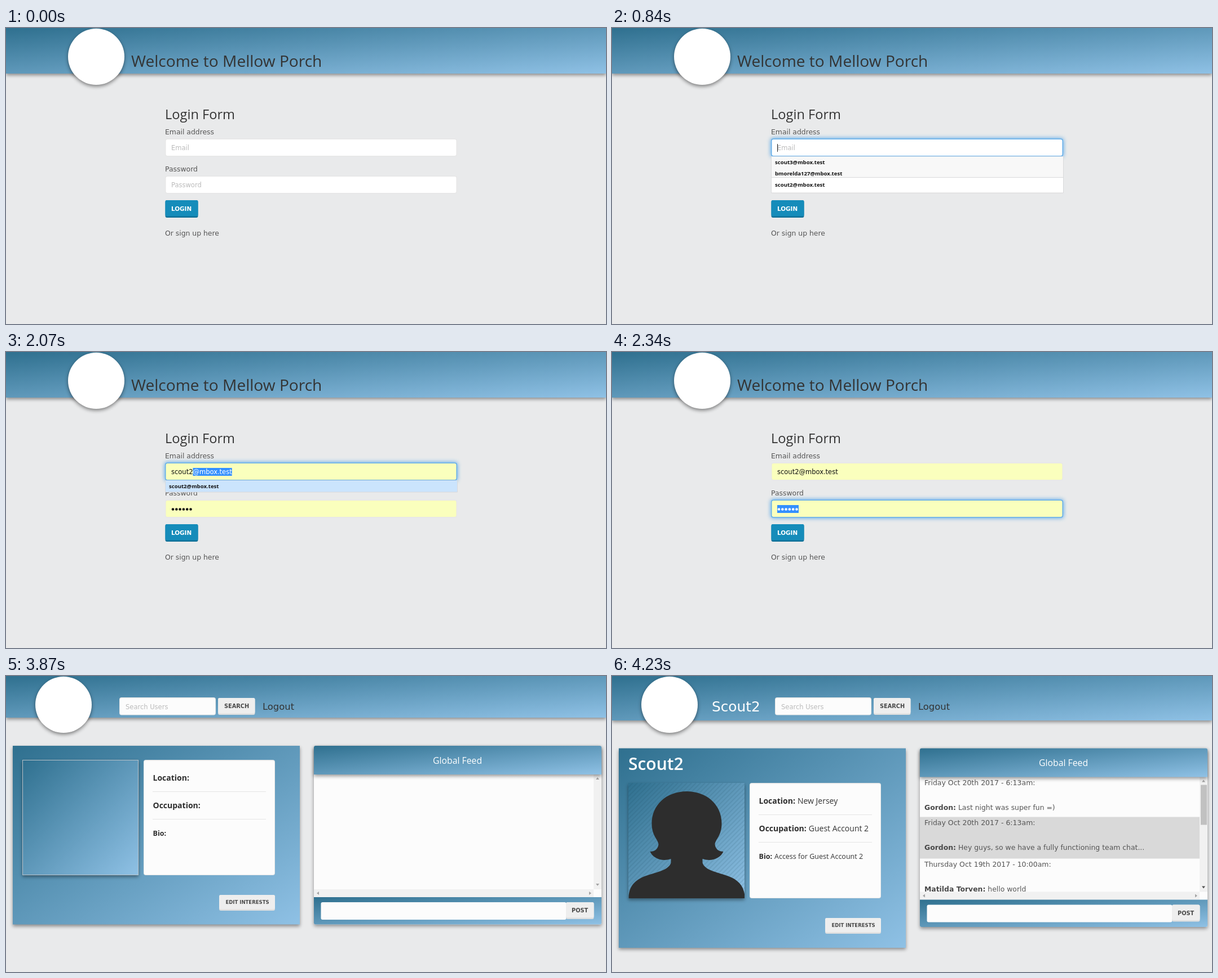
Write an HTML page with a canvas that moves like this. It is 1064 px wide and 526 px high and loops after 6750 ms.

```html
<!DOCTYPE html>
<html lang="en">
<head>
<meta charset="utf-8">
<title>Login demo</title>
<style>
  html, body { margin: 0; height: 100%; overflow: hidden; background: #e9eaeb; }
  canvas { display: block; }
</style>
</head>
<body>
<canvas id="stage" width="1064" height="526"></canvas>
<script>
const ctx = document.getElementById('stage').getContext('2d');
const LOOP = 6750;
const BODY = '"DejaVu Sans", sans-serif';
const HEAD = '"Open Sans", "Noto Sans", sans-serif';
const USER = 'scout2', DOMAIN = '@mbox.test';
const YELLOW = '#faffbd', SELECT = '#338fff', PAPER = '#fcfcfc', SOFT = '#bbb';

const ramp = (t, from, to) => Math.min(1, Math.max(0, (t - from) / (to - from)));

function text(str, x, y, size, color = '#555', family = BODY, weight = 400, align = 'left') {
  ctx.font = `${weight} ${size}px ${family}`;
  ctx.fillStyle = color;
  ctx.textAlign = align;
  ctx.fillText(str, x, y);
  return ctx.measureText(str).width;
}

function box(x, y, w, h, fill, radius = 0, shadow = 0) {
  ctx.save();
  if (shadow) {
    ctx.shadowColor = `rgba(0,0,0,${shadow})`;
    ctx.shadowBlur = 6;
    ctx.shadowOffsetY = 3;
  }
  ctx.fillStyle = fill;
  ctx.beginPath();
  ctx.roundRect(x, y, w, h, radius);
  ctx.fill();
  ctx.restore();
}

// Same geometry as CSS "to bottom right"
function blueBox(x, y, w, h, radius = 0, shadow = 0.4) {
  const k = w * h / (w * w + h * h), cx = x + w / 2, cy = y + h / 2;
  const g = ctx.createLinearGradient(cx - h * k, cy - w * k, cx + h * k, cy + w * k);
  g.addColorStop(0, '#2f708f');
  g.addColorStop(1, '#8fc1e5');
  box(x, y, w, h, g, radius, shadow);
}

function badge(x) {
  box(x - 50, 1, 100, 100, '#fff', 50, 0.45);
}

function button(label, x, y, w, h, size, tx, ty, fill = '#eee', edge = '#dfdfdf', color = '#484848') {
  box(x, y, w, h, edge, 3);
  box(x, y, w, h - 2.5, fill, 3);
  text(label, tx, ty, size, color, BODY, 700);
}

function caret(x, y) {
  box(x, y, 1, 14, '#222');
}

function field(y, fill, focus) {
  ctx.save();
  ctx.shadowColor = `rgba(102,175,233,${0.75 * focus})`;
  ctx.shadowBlur = 7;
  box(282, y, 518, 32, '#e7e7e7', 4);
  ctx.globalAlpha = focus;
  box(282, y, 518, 32, '#66afe9', 4);
  ctx.restore();
  box(283.5, y + 1.5, 515, 29, fill, 3);
}

function dropdown(names, bottom, fill) {
  box(282, 228, 519, bottom - 228, '#d9dadb', 1);
  box(283, 228.5, 517, bottom - 229.5, fill);
  names.forEach((name, i) => text(name + DOMAIN, 289, 242 + 20 * i, 9.6, '#111', HEAD, 700));
}

function emailField(t, filled, cleared) {
  const focus = ramp(t, 550, 690) * (1 - ramp(t, 2190, 2340));
  field(196.5, filled ? YELLOW : '#fff', focus);
  const typed = [900, 960, 1020, 1110, 1200, 1380].filter(at => t >= at).length;
  if (!typed || cleared) {
    text('Email', 293, 217, 11.5, SOFT);
    if (t >= 600 && !cleared) caret(293, 206);
    return;
  }
  const width = text(USER.slice(0, typed), 293, 217, 11.5, filled ? '#111' : '#555');
  if (!filled) {
    if (t < 1860) caret(293 + width, 206);
  } else if (t < 2100) {
    box(293 + width, 206, ctx.measureText(DOMAIN).width, 14, SELECT);
    text(DOMAIN, 293 + width, 217, 11.5, '#fff');
  } else {
    text(DOMAIN, 293 + width, 217, 11.5, '#111');
  }
}

function passwordField(t, filled, cleared) {
  field(262.5, filled ? YELLOW : '#fff', ramp(t, 2190, 2340));
  if (!filled || cleared) {
    text('Password', 293, 283, 11.5, SOFT);
    if (cleared) caret(293, 272);
    return;
  }
  const selected = t >= 2220;
  if (selected) box(293, 272, 38, 14, SELECT);
  ctx.fillStyle = selected ? '#fff' : '#111';
  for (let i = 0; i < 6; i++) {
    ctx.beginPath();
    ctx.arc(296 + 6.3 * i, 279.5, 2.3, 0, 7);
    ctx.fill();
  }
}

function loginPage(t) {
  const filled = t >= 2070, cleared = t >= 3270;
  blueBox(0, 0, 1064, 81);
  badge(160);
  text('Welcome to Mellow Porch', 222, 69, 28.1, '#333', HEAD);
  text('Login Form', 282, 162, 23.6, '#333', HEAD);
  text('Email address', 282, 188.5, 12.4);
  text('Password', 282, 254.5, 12.4);
  text('Or sign up here', 282, 369, 12.4);
  emailField(t, filled, cleared);
  passwordField(t, filled, cleared);
  button('LOGIN', 282.5, 306, 58, 31, 10.4, 293, 325, '#158cba', '#127299', '#fff');

  if (t >= 600 && t < 840) {
    ctx.globalAlpha = ramp(t, 570, 690);
    dropdown(['scout3', 'bmorelda127', 'scout2', 'scout1', 'bmorelda12'], 329, '#f8f8f8');
    ctx.globalAlpha = 1;
  } else if (t >= 840 && t < 870) {
    dropdown([], 293.5, '#fff');
    dropdown(['scout3', 'bmorelda127', 'scout2'], 266, '#f8f8f8');
  } else if (t >= 870 && t < 1380) {
    dropdown(['scout3', 'scout2', 'scout1'], 290, '#f8f8f8');
  } else if (t >= 1380 && t < 2100) {
    dropdown([USER], 249.5, filled ? '#cbe4fd' : '#f8f8f8');
  }
}

const halfFigure = new Path2D('M-.5 205C37 205 62 230 62 262C62 284 51 290 50 299C51 308 57 312 65 312C59 325 43 330 28 325V332C32 345 52 348 72 355C92 362 103 374 103 395H-.5Z');

// The portrait appears from the top down to the given row
function portrait(bottom) {
  ctx.save();
  ctx.beginPath();
  ctx.rect(29, 190, 206, bottom - 190);
  ctx.clip();
  ctx.strokeStyle = 'rgba(20,60,85,.1)';
  ctx.lineWidth = 2;
  ctx.beginPath();
  for (let x = 29; x < 445; x += 8) {
    ctx.moveTo(x, 190);
    ctx.lineTo(x - 206, 396);
  }
  ctx.stroke();
  ctx.fillStyle = '#2d2d2d';
  ctx.translate(132.5, 0);
  ctx.fill(halfFigure);
  ctx.scale(-1, 1);
  ctx.fill(halfFigure);
  ctx.restore();
}

function profilePanel(t, loaded) {
  blueBox(12, loaded ? 128.5 : 124, 509, loaded ? 354.5 : 317.5);
  if (loaded) text('Scout2', 29, 167, 30, '#fff', HEAD, 600);
  ctx.save();
  if (!loaded) ctx.translate(0, -41);
  blueBox(29, 190, 206, 205);
  if (loaded) {
    portrait(t < 4080 ? 204 : t < 4230 ? 237 : 395);
  } else {
    ctx.strokeStyle = '#b9c3ca';
    ctx.lineWidth = 1;
    ctx.strokeRect(29.5, 190.5, 205, 204);
  }
  box(244, 190, 233, 205, '#e7e7e7', 4);
  box(245, 191.5, 231, 202.5, PAPER, 3);
  const rows = [['Location:', 'New Jersey', 14], ['Occupation:', 'Guest Account 2', 14], ['Bio:', 'Access for Guest Account 2', 12.5]];
  rows.forEach(([label, value, size], i) => {
    const y = 227 + 49 * i, width = text(label, 260.5, y, size, '#2d2d2d', HEAD, 700);
    if (loaded) text(value, 260.5 + width + 4, y, size, '#333', HEAD);
    if (i < 2) box(260, y + 19, 201, 1, '#e5e5e5');
  });
  button('EDIT INTERESTS', 378, 430, 99, 28, 8.5, 389.5, 446);
  ctx.restore();
}

function arrow(x, y, dx, dy, color) {
  ctx.fillStyle = color;
  ctx.beginPath();
  ctx.moveTo(x + 2 * dx, y + 2 * dy);
  ctx.lineTo(x - 2 * dx + 3 * dy, y - 2 * dy + 3 * dx);
  ctx.lineTo(x - 2 * dx - 3 * dy, y - 2 * dy - 3 * dx);
  ctx.fill();
}

function posts() {
  ctx.save();
  ctx.beginPath();
  ctx.rect(546, 51.5, 496, 204);
  ctx.clip();
  box(546, 122, 496, 74, '#d9d9d9');
  const feed = [
    [65, 'Friday Oct 20th 2017 - 6:13am:', 'Gordon:', 'Last night was super fun =)'],
    [136, 'Friday Oct 20th 2017 - 6:13am:', 'Gordon:', 'Hey guys, so we have a fully functioning team chat...'],
    [210, 'Thursday Oct 19th 2017 - 10:00am:', 'Matilda Torven:', 'hello world']
  ];
  for (const [y, date, author, message] of feed) {
    text(date, 554, y, 12.5);
    const width = text(author, 554, y + 44.5, 12.4, '#484848', BODY, 700);
    text(message, 554 + width + 4, y + 44.5, 12.4);
  }
  ctx.restore();
}

function feedPanel(loaded, filled) {
  ctx.save();
  ctx.translate(0, loaded ? 128.5 : 124);
  box(546, 0, 510, 317.5, PAPER, 3, 0.4);
  if (filled) posts();
  box(1042, 51, 14, 204, '#f1f1f1');
  box(546, 255, 496, 14, '#f1f1f1');
  if (filled) box(1044, 65, 11, 71, '#c1c1c1');
  arrow(1049, 58, 0, -1, '#a3a3a3');
  arrow(1049, 247, 0, 1, filled ? '#505050' : '#a3a3a3');
  arrow(553, 262, -1, 0, '#a3a3a3');
  arrow(1036, 262, 1, 0, '#a3a3a3');
  blueBox(546, 0, 510, 51, [3, 3, 0, 0]);
  text('Global Feed', 800.5, 31.5, 15.8, '#fff', HEAD, 400, 'center');
  blueBox(546, 269, 510, 48.5, [0, 0, 3, 3], 0);
  box(558.5, 278, 435, 31, PAPER, 3);
  button('POST', 993, 278, 49.5, 30, 9.8, 1003, 296);
  ctx.restore();
}

function homePage(t) {
  const loaded = t >= 3900, shift = loaded ? 88 : 0;
  blueBox(0, 0, 1064, loaded ? 79 : 74);
  badge(102);
  if (loaded) text('Scout2', 177, 63, 24.8, '#fff');
  ctx.save();
  ctx.translate(shift, 0);
  box(201, 38, 171, 31.5, '#e7e7e7', 4);
  box(202, 39.5, 169, 29, PAPER, 3);
  text('Search Users', 212, 58.5, 11.5, SOFT);
  button('SEARCH', 376, 39, 65.5, 30, 9.8, 387, 57);
  text('Logout', 455, 60, 16.4, '#333');
  ctx.restore();
  profilePanel(t, loaded);
  feedPanel(loaded, t >= 3930);
}

function draw(now) {
  const t = now % LOOP;
  box(0, 0, 1064, 526, '#e9eaeb');
  (t < 3870 ? loginPage : homePage)(t);
  requestAnimationFrame(draw);
}
requestAnimationFrame(draw);
</script>
</body>
</html>
```
